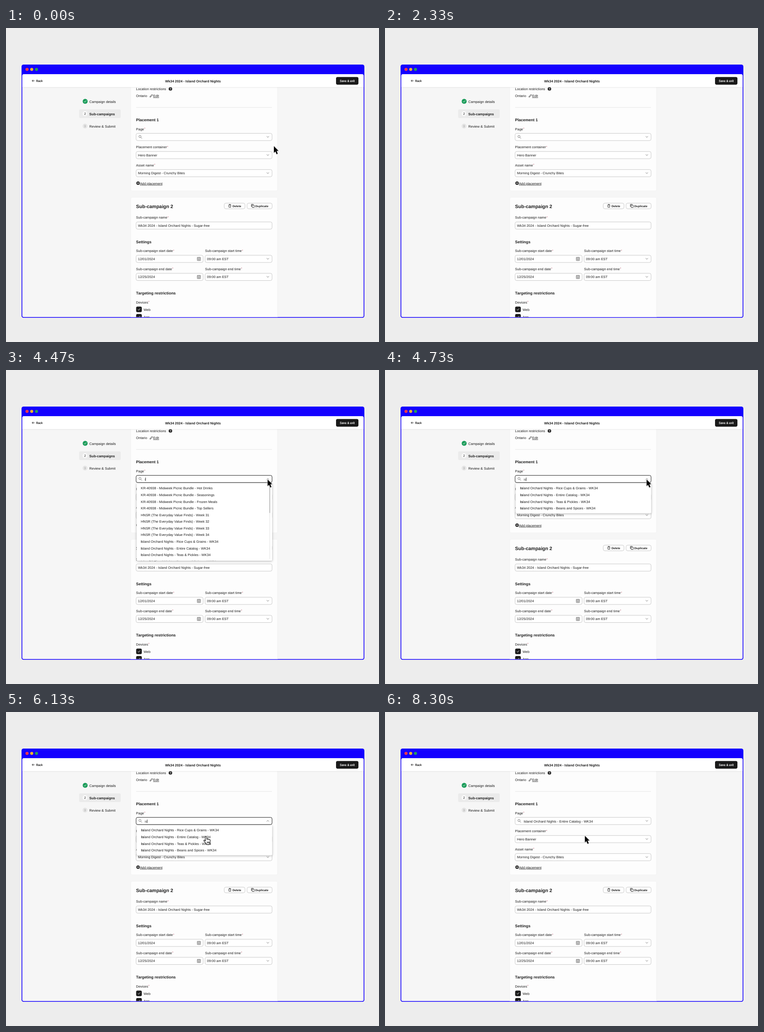
An HTML page that plays this animation: 816 px wide and 687 px high, repeating every 8.63 s.

```html
<!DOCTYPE html>
<html lang="en">
<head>
<meta charset="utf-8">
<title>Campaign form</title>
<style>
  html, body { margin: 0; width: 100%; height: 100%; overflow: hidden; background: #ededed; }
  svg { display: block; font: 7.4px "Liberation Sans", Arial, sans-serif; text-rendering: geometricPrecision; }
  text { fill: #1c1c1c; white-space: pre; }
  .bold { font-weight: 700; }
  .side { font-size: 7.52px; }
  .heading { font-size: 8.5px; font-weight: 700; }
  .title { font-size: 10.5px; font-weight: 700; }
  .button { font-size: 6.4px; font-weight: 700; }
  .medium { font-size: 6.45px; stroke: #1c1c1c; stroke-width: .18px; }
  .light { fill: #fff; stroke: #fff; }
  .link { text-decoration: underline; text-decoration-thickness: .6px; text-underline-offset: 1px; }
  .star { font-size: 5.6px; fill: #a8324a; }
  .line { fill: none; stroke: #1c1c1c; stroke-width: .9; }
  .grey { stroke: #707070; }
  .field { fill: #fff; stroke: #bdbdbd; stroke-width: .8; }
  .card { fill: #fdfdfd; stroke: #f0f0f0; stroke-width: .8; }
  .panel { fill: #fff; filter: drop-shadow(0 1.5px 2.5px rgba(0, 0, 0, .32)); }
  .header { filter: drop-shadow(0 .8px 1px rgba(0, 0, 0, .18)); }

  .open, .all, .one, .two, .empty, .chosen, .cursor, .arrow, .hand { animation: 8.63s step-end infinite; }
  .open { animation-name: open; }
  .all { animation-name: all; }
  .empty { animation-name: empty; }
  .one { animation-name: one; }
  .two { animation-name: two; }
  .chosen { animation-name: chosen; }
  .arrow { animation-name: arrow; }
  .hand { animation-name: hand; }
  .all .second { animation: weight 8.63s step-end infinite; }
  .cursor { animation-name: move; }

  @keyframes open { 0%, 78.44% { visibility: hidden } 27.46% { visibility: visible } }
  @keyframes all { 0%, 54.8% { visibility: hidden } 27.46% { visibility: visible } }
  @keyframes empty { 0%, 51.79% { visibility: hidden } 27.46% { visibility: visible } }
  @keyframes one { 0%, 54.8% { visibility: hidden } 51.79% { visibility: visible } }
  @keyframes two { 0%, 78.44% { visibility: hidden } 54.8% { visibility: visible } }
  @keyframes chosen { 0% { visibility: hidden } 78.44%, 100% { visibility: visible } }
  @keyframes weight { 0%, 54.8% { font-weight: 700 } 51.79% { font-weight: 400 } }
  @keyframes arrow {
    0%, 27.46%, 78.44%, 100% { visibility: visible }
    26.99%, 65.8% { visibility: hidden }
  }
  @keyframes hand { 0%, 78.44% { visibility: hidden } 65.8% { visibility: visible } }
  @keyframes move {
    0% { transform: translate(586px, 258.4px) }
    10.89% { transform: translate(586px, 258.4px); animation-timing-function: ease-out }
    17.73% { transform: translate(572.2px, 239.4px) }
    64.54% { transform: translate(572.2px, 239.4px); animation-timing-function: ease-out }
    71.03%, 100% { transform: translate(437.2px, 270.8px) }
  }
</style>
</head>
<body>
<svg id="stage" width="816" height="687" viewBox="0 0 816 687"></svg>
<script>
const campaign = 'Island Orchard Nights';
const week = 'WK34';

const text = (x, y, content, cls = '', extra = '') =>
  `<text x="${x}" y="${y}" class="${cls}" ${extra}>${content}</text>`;
const box = (x, y, w, h, r, attrs) =>
  `<rect x="${x}" y="${y}" width="${w}" height="${h}" rx="${r}" ${attrs}/>`;
const dot = (x, y, r, fill) => `<circle cx="${x}" cy="${y}" r="${r}" fill="${fill}"/>`;
const line = (d, cls = '', attrs = '') => `<path d="${d}" class="line ${cls}" ${attrs}/>`;
const group = (cls, ...parts) => `<g class="${cls}">${parts.join('')}</g>`;

const label = (x, y, content) =>
  text(x, y, `${content}<tspan class="star" dx=".6" dy="-1.7">*</tspan>`);
const chevron = (x, y, dir = 1) =>
  line(`M${x - 2.5} ${y - 1.2 * dir}l2.5 ${2.4 * dir} 2.5 ${-2.4 * dir}`, 'grey');
const calendar = (x, y) =>
  box(x - 3.7, y - 3.3, 7.4, 7.2, .8, 'fill="#ddd" stroke="#777" stroke-width=".8"') +
  line(`M${x - 3.7} ${y - 1.6}h7.4M${x - 2} ${y - 4.4}v1.6M${x + 2} ${y - 4.4}v1.6M${x - 2.4} ${y + .7}h4.8M${x - 2.4} ${y + 2.3}h4.8`,
    'grey', 'stroke-dasharray="1.3 .5"');

function field(x, mid, w, value, icon) {
  const right = x + w;
  return box(x, mid - 7.9, w, 15.8, 3.4, 'class="field"') +
    text(x + 4.2, mid + 2.8, value) +
    (icon === 'date' ? calendar(right - 9.2, mid) : icon === 'none' ? '' : chevron(right - 9.2, mid - .3));
}

const search = `<circle cx="293.1" cy="237.4" r="2.4" class="line grey"/>` + line('M294.9 239.2l2.7 2.7', 'grey');
const caret = x => line(`M${x} 235.4v7.2`, '', 'stroke-width=".7"');
const tick = (x, y) => line(`M${x - 2.6} ${y}l1.9 1.9 3.4-3.8`, '', 'style="stroke:#fff"');
const checkbox = (y, name) =>
  box(284.7, y - 6.2, 12.4, 12.4, 3, 'fill="#1c1c1c"') + tick(290.9, y) + text(301, y + 3, name);

const seasonal = ['Rice Cups &amp; Grains', 'Entire Catalog', 'Teas &amp; Pickles', 'Beans and Spices']
  .map(name => `${campaign} - ${name} - ${week}`);
const marked = seasonal.map(name =>
  `<tspan class="bold">${name[0]}</tspan><tspan class="bold second">${name[1]}</tspan>${name.slice(2)}`);
const everything = [
  ...['Hot Drinks', 'Seasonings', 'Frozen Meals', 'Top Sellers'].map(name => `KR-40938 - Midweek Picnic Bundle - ${name}`),
  ...[31, 32, 33, 34].map(n => `HNSR (The Everyday Value Finds) - Week ${n}`),
  ...marked
];
const options = (x, items) => items.map((item, i) => text(x, 261.4 + 14.57 * i, item)).join('');

const titleBar =
  box(34, 80, 750, 554, 4.5, 'fill="#1400ff"') +
  dot(46, 90.6, 3.3, '#ff3847') + dot(56.3, 90.6, 3.3, '#f7b42c') + dot(66.7, 90.6, 3.3, '#259b5c') +
  box(35.6, 101, 746.8, 531.4, 3.5, 'fill="#f6f6f6"');

const sidebar =
  dot(173.2, 160.4, 5.4, '#1b9c5a') + tick(173.2, 160.4) +
  text(182.3, 163.5, 'Campaign details', 'side') +
  box(160, 178, 91, 19, 3, 'fill="#ebebeb"') + dot(172.8, 187.5, 5.4, '#fafafa') +
  text(172.8, 189.9, '2', '', 'font-size="6.8" text-anchor="middle"') +
  text(182.3, 190.5, 'Sub-campaigns', 'side bold') +
  dot(172.8, 214.5, 5.2, '#e5e5e5') +
  text(172.8, 216.8, '3', '', 'font-size="6.4" text-anchor="middle" style="fill:#999"') +
  text(182.3, 217.5, 'Review &amp; Submit', 'side');

const placementCard =
  box(273, 95, 321, 261.4, 3, 'class="card"') +
  text(284.6, 136.2, 'Location restrictions') + dot(359.7, 133.3, 3.8, '#1c1c1c') +
  text(359.7, 135.6, '?', 'bold', 'font-size="6.4" text-anchor="middle" style="fill:#fff"') +
  text(284.6, 151.2, 'Ontario') +
  '<path d="M314.9 151.2l.6-2 3.9-3.9 1.4 1.4-3.9 3.9z" fill="none" stroke="#1c1c1c" stroke-width=".9"/>' +
  text(322, 151.2, 'Edit', 'link') +
  line('M284.6 173.8H582', '', 'style="stroke:#e4e4e4"') +
  text(284.6, 204.2, 'Placement 1', 'heading') +
  label(284.6, 223.9, 'Page') + field(284.6, 238.4, 297.4, '') + search +
  text(303.2, 241.5, seasonal[1], 'chosen') +
  label(284.6, 263.4, 'Placement container') + field(284.6, 278.1, 297.4, 'Hero Banner') +
  label(284.6, 303, 'Asset name') + field(284.6, 317.6, 297.4, 'Morning Digest - Crunchy Bites') +
  dot(288.9, 339.4, 3.7, '#1c1c1c') + line('M286.9 339.4h4M288.9 337.4v4', '', 'style="stroke:#fff"') +
  text(292.9, 342.6, 'Add placement', 'link');

const campaignCard =
  box(273, 370.2, 321, 290, 3, 'class="card"') +
  text(284.6, 393.6, 'Sub-campaign 2', 'title') +
  box(477.4, 383.2, 45.4, 12.4, 3.6, 'class="field"') +
  line('M487 387h5.4M488.6 386.8v-.9h2.2v.9M487.7 387.2v5h4v-5') + text(495.4, 391.6, 'Delete', 'button') +
  box(527.4, 383.2, 54.8, 12.4, 3.6, 'class="field"') +
  line('M538.4 387.6h4.6v5h-4.6zM536.8 391v-5.2h4.6') + text(545.2, 391.6, 'Duplicate', 'button') +
  label(284.6, 417.3, 'Sub-campaign name') +
  field(284.6, 432.2, 297.4, `Wk34 2024 - ${campaign} - Sugar-free`, 'none') +
  text(284.6, 470.6, 'Settings', 'heading') +
  ['start', 'end'].map((edge, i) => {
    const y = 490.4 + 39.5 * i;
    return label(284.6, y, `Sub-campaign ${edge} date`) + label(435.6, y, `Sub-campaign ${edge} time`) +
      field(284.6, y + 14.7, 146.6, i ? '12/25/2024' : '12/01/2024', 'date') +
      field(435.6, y + 14.7, 146.4, '09:00 am EST');
  }).join('') +
  text(284.6, 583.1, 'Targeting restrictions', 'heading') +
  label(284.6, 602.9, 'Devices') + checkbox(615.6, 'Web') + checkbox(632, 'App');

const header = group('header', '<path d="M35.6 129.6V104.5a3.5 3.5 0 0 1 3.5-3.5H778.9a3.5 3.5 0 0 1 3.5 3.5V129.6z" fill="#fff"/>') +
  line('M62.4 115.5h-5.2m2.5-2.6l-2.6 2.6 2.6 2.6') + text(65.9, 117.8, 'Back', 'medium') +
  text(409, 118.8, `Wk34 2024 - ${campaign}`, 'bold', 'text-anchor="middle"') +
  box(722, 107.2, 49, 16.8, 3.4, 'fill="#1a1a1a"') +
  text(746.5, 117.8, 'Save &amp; exit', 'medium light', 'text-anchor="middle"');

const dropdown =
  group('open',
    box(284.6, 230.5, 297.4, 15.8, 3.4, 'fill="#fff" stroke="#2a2a2a"'), search, chevron(572.8, 238.4, -1)) +
  group('all',
    box(285.8, 247.4, 296.4, 169.8, 2, 'class="panel"'),
    `<g clip-path="url(#list)">${options(295, everything)}</g>`,
    box(576.2, 252, 1.8, 162, .9, 'fill="#eee"'), box(576.2, 252, 1.8, 61, .9, 'fill="#bcbcbc"')) +
  group('two', box(285.8, 247.4, 296.4, 66, 2, 'class="panel"'), options(295.6, marked),
    text(303.2, 241.5, 'is', '', 'style="fill:#555"'), caret(308.9)) +
  group('empty', caret(304.8)) +
  group('one', text(303.2, 241.5, 'i', '', 'style="fill:#555"'), caret(305.4));

const cursor = group('cursor',
  '<path class="arrow" d="M0 0V14.8L3.3 11.7 5.9 17.8 8.6 16.6 6 10.6H10.4z" fill="#000" stroke="#fff" stroke-width="1.1" paint-order="stroke"/>',
  '<path class="hand" d="M-1.6 3C-1.7.7 1.2.6 1.6 2.8L2.4 8C2.7 6.4 4.5 6.5 4.9 8 5.3 6.8 7 7 7.3 8.5 7.9 7.7 9.5 8.2 9.6 9.8 9.8 12.8 9.4 14 8.5 16V19H1.1L.8 17.4C-1 15.5-2.5 13.6-4.2 11.3-5.2 9.7-3.3 8.7-2 10L-.7 11.4zM3.1 13v3.2M5.1 13v3.2M7 13v3.2" fill="#fff" stroke="#000" stroke-width="1.1" stroke-linejoin="round"/>');

document.getElementById('stage').innerHTML =
  '<clipPath id="page"><rect x="35.6" y="101" width="746.8" height="531.4" rx="3.5"/></clipPath>' +
  '<clipPath id="list"><rect x="285.8" y="247" width="296.4" height="170.2"/></clipPath>' +
  titleBar + `<g clip-path="url(#page)">${sidebar}${placementCard}${campaignCard}${header}</g>` +
  dropdown + cursor;
</script>
</body>
</html>
```
